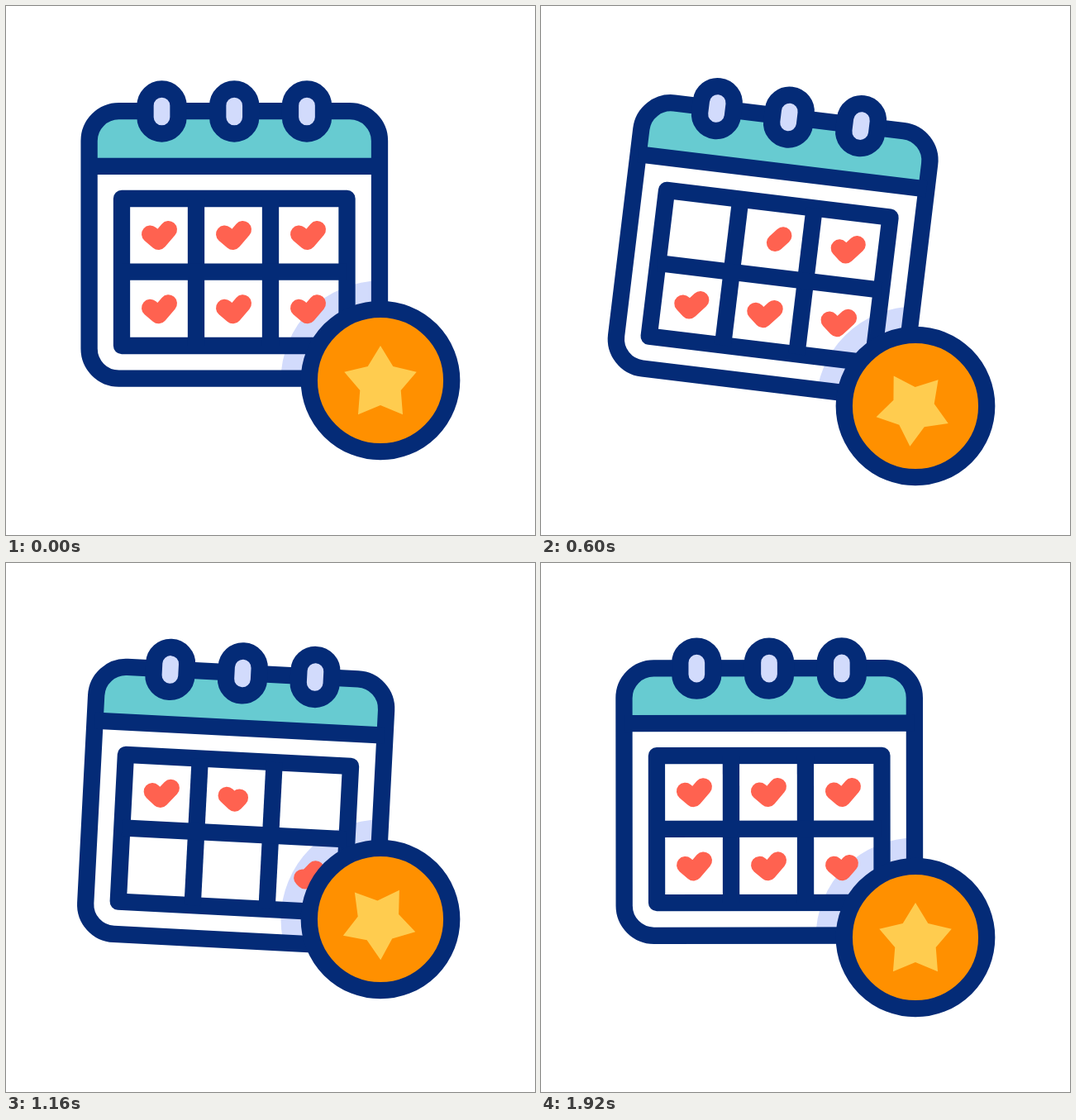
An HTML page with a canvas for the animation above (1960 ms loop, 640x640 px).

```html
<!DOCTYPE html>
<html lang="en">
<head>
<meta charset="utf-8">
<title>Calendar with star badge</title>
<style>
html, body { margin: 0; width: 100%; height: 100%; overflow: hidden; background: #fff; }
canvas { display: block; width: 100vmin; height: 100vmin; }
</style>
</head>
<body>
<canvas id="stage" width="640" height="640"></canvas>
<script>
const ctx = document.getElementById('stage').getContext('2d');
const LOOP = 1960, STEP = 40;
const NAVY = '#042b77', LILAC = '#d2dbfc', TEAL = '#67cbd1',
      CORAL = '#ff6250', ORANGE = '#ff9000', YELLOW = '#ffcc4f';

// Motion keys: [ms, value]
const calendarTurn = [[80, 0], [240, .35], [550, 7.5], [600, 6.9], [800, -3.75],
                      [1160, 2.95], [1600, -1.6], [1960, 0]];
const calendarDrop = [[80, 0], [240, 3.5], [440, 24], [600, 5.6], [790, -25.3],
                      [1160, 5.7], [1600, 2.5], [1960, 0]];
const badgeDrop = [[80, 0], [240, 2.5], [530, 35.5], [600, 31], [800, -29.5],
                   [940, -37], [1160, -22], [1400, 0], [1960, 0]];
const starTurn = [[80, 0], [240, -7], [420, -34], [600, 41], [800, 265],
                  [1080, 396], [1160, 393], [1600, 364], [1960, 360]];

// Hearts, row by row: when each starts to vanish and to be redrawn
const vanishAt = [160, 368, 575, 575, 760, 1052];
const redrawAt = [716, 888, 1165, 1165, 1312, 1585];
const TRACE = 395;
const heart = [[174.5, 276], [184.5, 284.5], [196.5, 270.5]];
const heartLength = Math.hypot(10, 8.5) + Math.hypot(12, 14);

const clamp = x => Math.min(1, Math.max(0, x));

// Monotone cubic interpolation: flat at turning points, smooth elsewhere
function track(keys, t) {
  const last = keys.length - 1;
  if (t <= keys[0][0]) return keys[0][1];
  if (t >= keys[last][0]) return keys[last][1];
  const i = keys.findIndex(k => k[0] > t) - 1;
  const slope = n => (keys[n + 1][1] - keys[n][1]) / (keys[n + 1][0] - keys[n][0]);
  const tangent = n => {
    if (n === 0 || n === last) return 0;
    const a = slope(n - 1), b = slope(n);
    return a * b > 0 ? 2 * a * b / (a + b) : 0;
  };
  const [t0, v0] = keys[i], [t1, v1] = keys[i + 1];
  const span = t1 - t0, u = (t - t0) / span, w = 1 - u;
  return v0 * (1 + 2 * u) * w * w + v1 * u * u * (3 - 2 * u)
       + span * u * w * (tangent(i) * w - tangent(i + 1) * u);
}

function paint(fill, stroke, width = 20.3) {
  if (fill) { ctx.fillStyle = fill; ctx.fill(); }
  if (stroke) { ctx.strokeStyle = stroke; ctx.lineWidth = width; ctx.stroke(); }
}

function box(x0, y0, x1, y1, r) {
  ctx.beginPath();
  ctx.roundRect(x0, y0, x1 - x0, y1 - y0, r);
}

function line(...points) {
  ctx.beginPath();
  points.forEach(p => ctx.lineTo(...p));
}

function disc(x, y, r) {
  ctx.beginPath();
  ctx.arc(x, y, r, 0, 2 * Math.PI);
}

function turn(degrees, x, y) {
  ctx.translate(x, y);
  ctx.rotate(degrees * Math.PI / 180);
  ctx.translate(-x, -y);
}

function placeCalendar(t) {
  ctx.translate(0, track(calendarDrop, t));
  turn(track(calendarTurn, t), 276, 325);
}

function drawHeart(i, t) {
  const gone = clamp((t - vanishAt[i]) / TRACE);
  const drawn = clamp((t - redrawAt[i]) / TRACE);
  const from = drawn > 0 ? 0 : gone, to = drawn > 0 ? drawn : 1;
  if (from >= to) return;
  ctx.save();
  ctx.translate(i % 3 * 90, i < 3 ? 0 : 89.3);
  ctx.lineCap = 'round';
  ctx.setLineDash([(to - from) * heartLength + (to === 1 ? 1 : 0), 99]);
  ctx.lineDashOffset = -from * heartLength;
  line(...heart);
  paint(null, CORAL, 21);
  ctx.restore();
}

function drawCalendar(t, badgeY) {
  ctx.save();
  placeCalendar(t);
  box(100.6, 127.2, 452, 450.6, 36);
  paint('#fff');

  // Badge shadow falls only on the page
  ctx.save();
  ctx.clip();
  ctx.fillStyle = TEAL;
  ctx.fillRect(90, 117, 373, 77);
  ctx.setTransform(1, 0, 0, 1, 0, 0);
  disc(453, badgeY, 120.5);
  paint(LILAC);
  ctx.restore();

  box(100.6, 127.2, 452, 450.6, 36);
  paint(null, NAVY);
  line([100.6, 193.8], [452, 193.8]);
  paint(null, NAVY);

  line([140, 233], [412.5, 233], [412.5, 411], [140, 411]);
  ctx.closePath();
  paint(null, NAVY);
  for (const x of [230, 320]) {
    line([x, 233], [x, 411]);
    paint(null, NAVY);
  }
  line([140, 321.7], [412.5, 321.7]);
  paint(null, NAVY);

  for (const x of [188.5, 276.2, 364]) {
    box(x - 20, 100.5, x + 20, 154.5, 20);
    paint(LILAC, NAVY);
  }
  for (let i = 0; i < 6; i++) drawHeart(i, t);
  ctx.restore();
}

function drawBadge(t, y) {
  ctx.save();
  ctx.translate(453, y);
  disc(0, 0, 86.2);
  paint(ORANGE, NAVY);
  turn(track(starTurn, t), 0, 0);
  ctx.beginPath();
  for (let i = 0; i < 10; i++) {
    const r = i % 2 ? 26 : 46, a = i * Math.PI / 5;
    ctx.lineTo(r * Math.sin(a), 4 - r * Math.cos(a));
  }
  paint(YELLOW);
  ctx.restore();
}

function draw(t) {
  ctx.fillStyle = '#fff';
  ctx.fillRect(0, 0, 640, 640);
  ctx.lineJoin = 'round';
  const badgeY = 453 + track(badgeDrop, t);
  drawCalendar(t, badgeY);
  drawBadge(t, badgeY);
}

function frame() {
  draw(Math.floor(performance.now() % LOOP / STEP) * STEP);
  requestAnimationFrame(frame);
}
frame();
</script>
</body>
</html>
```
